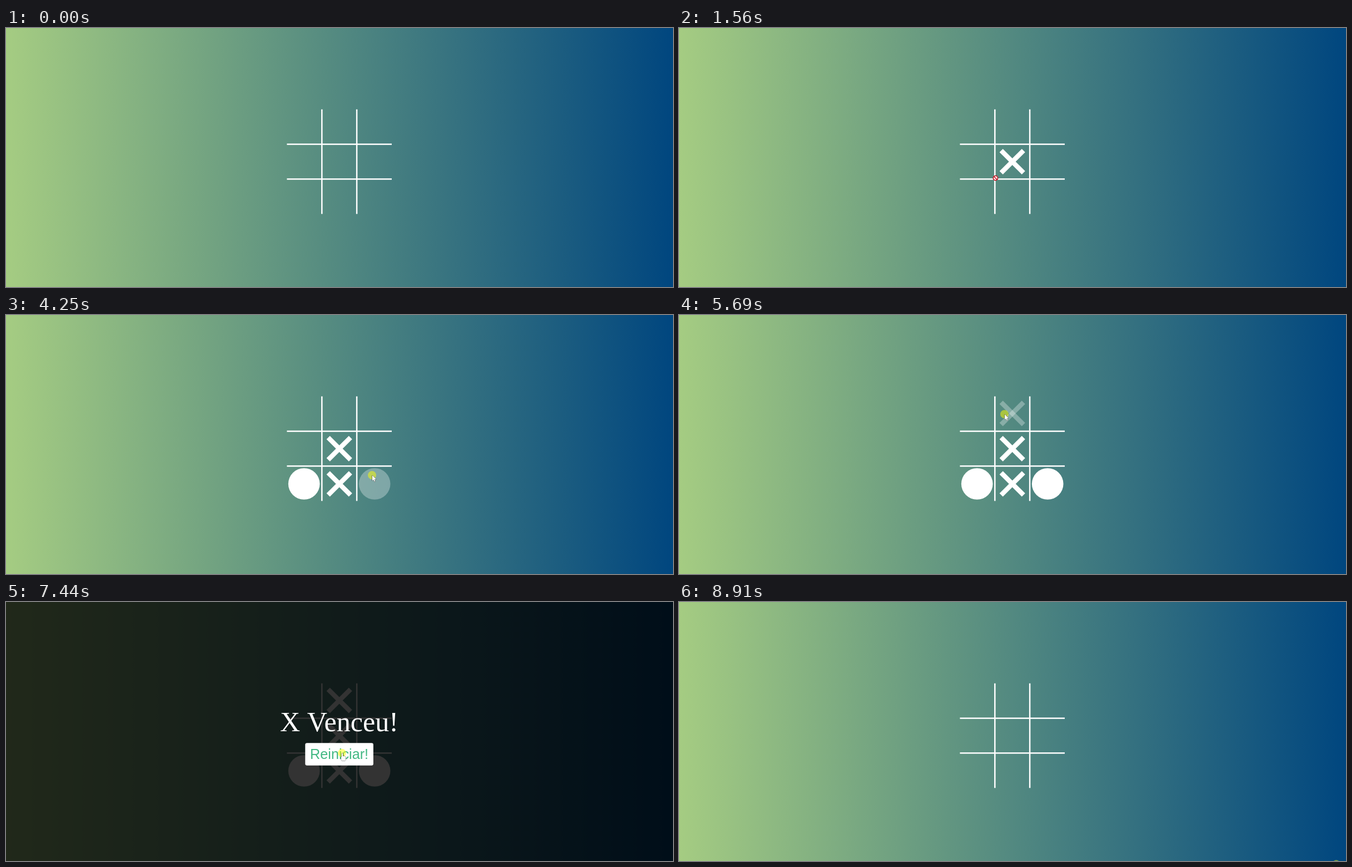
Write an HTML page with a canvas that moves like this. It is 1200 by 467 pixels and loops after 9.04 s.

```html
<!DOCTYPE html>
<html lang="pt">
<head>
<meta charset="utf-8">
<title>Jogo da velha</title>
<style>
  html, body { margin: 0; width: 100%; height: 100%; overflow: hidden; }
  canvas { display: block; }
</style>
</head>
<body>
<canvas id="stage" width="1200" height="467"></canvas>
<script>
const W = 1200, H = 467, LOOP = 9040, TICK = 70;
const GREEN = '#42b883';
const ctx = document.getElementById('stage').getContext('2d');

// Board geometry, measured from its centre
const CX = 599.7, CY = 241, PITCH = 63.5, LINE_AT = 31.4, HALF = 94.3, LINE = 2.5;
const MARK = 56.7, BAR = MARK * 0.15;
const BUTTON = { x: 538.3, y: 254.2, w: 122.6, h: 40.6 };

// Pointer stops: each is reached in a straight line, some end with a click
const stop = (leave, arrive, x, y, press = Infinity, release = Infinity) =>
  ({ leave, arrive, x, y, press, release });
const ENTRY = { x: 1209, y: 475 };
const STOPS = [
  stop(50, 540, 548, 243),
  stop(540, 820, 597, 247, 1350, 1420),
  stop(1420, 1770, 528, 306, 1950, 2090),
  stop(2090, 2570, 592, 299, 3030, 3170),
  stop(3170, 3580, 661, 283),
  stop(3910, 4050, 659, 289, 4250, 4390),
  stop(4390, 5020, 545, 190),
  stop(5410, 5690, 586, 179, 5690, 5960),
  stop(6100, 6650, 605, 272.5, 7440, 7640),
  stop(8100, 8380, 1044, 469),
  stop(8380, 8450, 1183, 473, 8910, LOOP)
];

function pointerAt(t) {
  let { x, y } = ENTRY;
  for (const s of STOPS) {
    if (t < s.leave) break;
    const elapsed = Math.floor((t - s.leave) / TICK) * TICK;
    const k = t >= s.arrive ? 1 : elapsed / (s.arrive - s.leave);
    x += (s.x - x) * k;
    y += (s.y - y) * k;
  }
  return { x, y };
}

function cellAt({ x, y }) {
  if (Math.max(Math.abs(x - CX), Math.abs(y - CY)) > HALF) return null;
  const index = d => d < -LINE_AT ? -1 : d > LINE_AT ? 1 : 0;
  return { col: index(x - CX), row: index(y - CY) };
}

// Clicks on the board place marks; the click after the winning one restarts
const clicks = STOPS.filter(s => s.press < LOOP);
const turns = clicks.slice(0, 5).map(s => ({ at: s.release, ...cellAt(s) }));
const WIN = turns[4].at, RESTART = clicks[5].release;

function disc(x, y, r, color) {
  ctx.fillStyle = color;
  ctx.beginPath();
  ctx.arc(x, y, r, 0, Math.PI * 2);
  ctx.fill();
}

function drawMark({ col, row }, isX, color) {
  const x = CX + col * PITCH, y = CY + row * PITCH;
  if (!isX) return disc(x, y, MARK / 2, color);
  ctx.fillStyle = color;
  for (const side of [1, -1]) {
    ctx.save();
    ctx.translate(x, y);
    ctx.rotate(side * Math.PI / 4);
    ctx.fillRect(-MARK / 2, -BAR / 2, MARK, BAR);
    ctx.restore();
  }
}

function drawBackground() {
  const fade = ctx.createLinearGradient(0, 0, W, 0);
  fade.addColorStop(0, '#a5cc82');
  fade.addColorStop(1, '#00467f');
  ctx.fillStyle = fade;
  ctx.fillRect(0, 0, W, H);
}

function drawGrid() {
  ctx.fillStyle = '#fff';
  for (const d of [-LINE_AT, LINE_AT]) {
    ctx.fillRect(CX + d - LINE / 2, CY - HALF, LINE, 2 * HALF);
    ctx.fillRect(CX - HALF, CY + d - LINE / 2, 2 * HALF, LINE);
  }
}

function drawModal(hot) {
  const { x, y, w, h } = BUTTON;
  ctx.fillStyle = 'rgba(0, 0, 0, 0.8)';
  ctx.fillRect(0, 0, W, H);
  ctx.textAlign = 'center';
  ctx.fillStyle = '#fff';
  ctx.font = '50.1px "Liberation Serif", serif';
  ctx.fillText('X Venceu!', 599.5, 232.8);
  ctx.fillStyle = hot ? '#fff' : GREEN;
  ctx.beginPath();
  ctx.roundRect(x, y, w, h, 3.2);
  ctx.fill();
  ctx.fillStyle = hot ? GREEN : '#fff';
  ctx.font = '25.2px "Liberation Sans", sans-serif';
  ctx.fillText('Reiniciar!', x + w / 2, 283.2);
}

function outlined() {
  ctx.fillStyle = '#fff';
  ctx.strokeStyle = '#222';
  ctx.lineWidth = 0.8;
  ctx.stroke();
  ctx.fill();
}

const cursors = {
  arrow() {
    ctx.beginPath();
    for (const [x, y] of [[0, 0], [0, 10], [2.3, 8], [4, 11.5], [5.5, 11], [4, 7.4], [7.2, 7.2]]) {
      ctx.lineTo(x, y);
    }
    ctx.closePath();
    outlined();
  },
  hand() {
    ctx.beginPath();
    ctx.roundRect(-1, 0, 2, 9, 1);
    ctx.roundRect(-2, 5.5, 8.2, 8.5, 2.5);
    outlined();
  },
  denied() {
    disc(0, 0, 4.6, '#fff');
    ctx.strokeStyle = '#c00d1a';
    ctx.lineWidth = 1.6;
    ctx.beginPath();
    ctx.arc(0, 0, 4.1, 0, Math.PI * 2);
    ctx.moveTo(-2.9, -2.9);
    ctx.lineTo(2.9, 2.9);
    ctx.stroke();
  }
};

function drawPointer({ x, y }, kind, pressed) {
  if (pressed) disc(x - 0.5, y - 0.2, 7.5, 'rgba(255, 255, 0, 0.5)');
  ctx.save();
  ctx.translate(x, y);
  cursors[kind]();
  ctx.restore();
}

function draw(t) {
  const pointer = pointerAt(t);
  const placed = t < RESTART ? turns.filter(m => t >= m.at) : [];
  const pressed = clicks.some(c => t >= c.press && t < c.release);
  const isXTurn = placed.length % 2 === 0;
  let kind = 'arrow';

  drawBackground();
  drawGrid();
  placed.forEach((m, i) => drawMark(m, i % 2 === 0, '#fff'));

  if (t >= WIN && t < RESTART) {
    const { x, y, w, h } = BUTTON;
    const hot = pointer.x > x && pointer.x < x + w && pointer.y > y && pointer.y < y + h;
    drawModal(hot);
    if (hot) kind = 'hand';
  } else {
    const cell = cellAt(pointer);
    if (cell) {
      const taken = placed.some(m => m.col === cell.col && m.row === cell.row);
      if (taken) kind = 'denied';
      else drawMark(cell, isXTurn, 'rgba(255, 255, 255, 0.3)');
    }
  }
  drawPointer(pointer, kind, pressed);
}

const start = performance.now();
function frame() {
  draw((performance.now() - start) % LOOP);
  requestAnimationFrame(frame);
}
frame();
</script>
</body>
</html>
```
